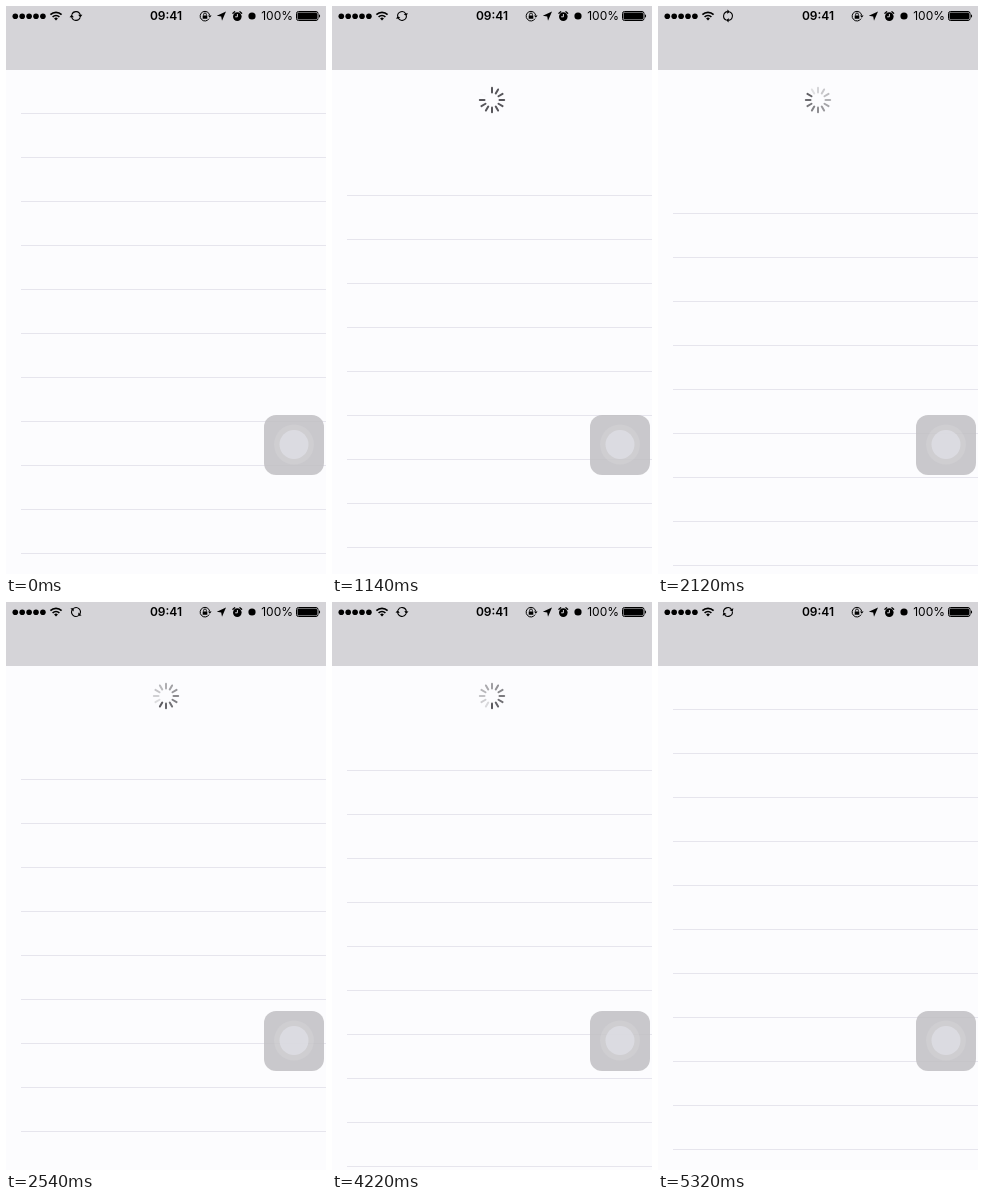
Write an HTML page that moves like this. It is 320x568 px and loops after 5.36 s.

```html
<!DOCTYPE html>
<html lang="en">
<head>
<meta charset="utf-8">
<title>Pull to refresh</title>
<style>
  html, body { margin: 0; width: 100%; height: 100%; overflow: hidden; background: #fcfcfe; }
  svg { display: block; width: 320px; height: 568px; }
  text { font-family: Inter, Roboto, "Liberation Sans", sans-serif; font-size: 12px; fill: #000; }
</style>
</head>
<body>
<svg viewBox="0 0 320 568">
  <rect width="320" height="568" fill="#fcfcfe"/>
  <g id="rows" fill="#e6e5ed"></g>
  <g id="spinner" stroke="#57565b" stroke-width="2" stroke-linecap="round"></g>

  <rect width="320" height="64" fill="#d5d4d8"/>
  <g id="signal"></g>

  <!-- wifi -->
  <g fill="none" stroke="#000" stroke-width="1.7">
    <path d="M44.4 8.6a8 8 0 0 1 11.2 0M46.6 11a4.9 4.9 0 0 1 6.8 0"/>
    <path d="M50 14.4l-1.9-2a2.8 2.8 0 0 1 3.8 0z" fill="#000" stroke="none"/>
  </g>

  <!-- sync arrows -->
  <g id="sync">
    <g id="arc">
      <path d="M65.8 8.6a4.4 4.4 0 0 1 8.5 .6" fill="none" stroke="#000" stroke-width="1.1"/>
      <path d="M72.2 8.8h4.2l-2.1 2.8z"/>
    </g>
    <use href="#arc" transform="rotate(180 70 10)"/>
  </g>

  <text x="160" y="14.4" text-anchor="middle" font-weight="600">09:41</text>

  <!-- rotation lock -->
  <g fill="none" stroke="#000">
    <path d="M203.1 12.6a4.8 4.8 0 1 1 .6-3.2" stroke-width="1"/>
    <path d="M197.6 9.6v-1.2a1.4 1.4 0 0 1 2.8 0v1.2" stroke-width=".9"/>
    <path d="M196.7 9.4h4.6v3.3h-4.6zM202 9.4h3.6l-1.8 2.4z" fill="#000" stroke="none"/>
  </g>

  <!-- location -->
  <path d="M220 5.6l-4 9.2-.8-4.2-4.4-.8z"/>

  <!-- alarm -->
  <circle cx="231.3" cy="10.6" r="4.3"/>
  <path d="M226.9 7.3l1.8-1.6M235.7 7.3l-1.8-1.6" stroke="#000" stroke-width="1.2" stroke-linecap="round"/>
  <path d="M231.4 8v2.8h-2.2" fill="none" stroke="#d5d4d8"/>

  <circle cx="246" cy="10" r="3.6"/>
  <text x="287" y="14.4" text-anchor="end">100%</text>

  <!-- battery -->
  <rect x="290.5" y="5.5" width="21.5" height="9" rx="2" fill="none" stroke="#000"/>
  <rect x="291.5" y="6.5" width="19.5" height="7" rx="1"/>
  <path d="M313 8.2a2 2 0 0 1 0 3.6z"/>

  <!-- floating button -->
  <rect x="258" y="409" width="60" height="60" rx="12" fill="#c1c0c4" fill-opacity=".85"/>
  <circle cx="288" cy="438.5" r="20" fill="#fff" fill-opacity=".1"/>
  <circle cx="288" cy="438.5" r="14.5" fill="#e2e2ea" fill-opacity=".65"/>
</svg>
<script>
const LOOP = 5360, HOLD = 60.5, PEAK = 150;
const RELEASE = 1880, CLOSE = 4586;
const rows = document.getElementById('rows');
const spinner = document.getElementById('spinner');
const sync = document.getElementById('sync');
const clamp = v => Math.min(1, Math.max(0, v));

function add(parent, tag, attrs) {
  const el = document.createElementNS('http://www.w3.org/2000/svg', tag);
  for (const key in attrs) el.setAttribute(key, attrs[key]);
  return parent.appendChild(el);
}

for (let i = 0; i < 11; i++)
  add(rows, 'rect', { x: 15, y: 107 + 44 * i, width: 305, height: 1 });

for (let i = 0; i < 5; i++)
  add(document.getElementById('signal'), 'circle', { cx: 9.3 + 6.9 * i, cy: 10.3, r: 2.8 });

const petals = Array.from({ length: 12 }, (_, i) =>
  add(spinner, 'line', { x1: 0, y1: -7.5, x2: 0, y2: -12.2, transform: `rotate(${30 * i})` }));

// Finger drag as time, distance and speed
const drag = [[565, 0, .1], [1140, 82, .135], [1700, 146, .05], [1850, PEAK, 0]];

function dragAt(t) {
  if (t <= drag[0][0]) return 0;
  const n = drag.findIndex(p => p[0] > t);
  if (n < 0) return PEAK;
  const [t0, y0, v0] = drag[n - 1], [t1, y1, v1] = drag[n];
  const d = t1 - t0, s = (t - t0) / d, r = 1 - s;
  return r * r * ((1 + 2 * s) * y0 + s * d * v0) + s * s * ((3 - 2 * s) * y1 - r * d * v1);
}

function pullAt(t) {
  if (t < RELEASE) return dragAt(t);
  if (t < CLOSE) return HOLD + (PEAK - HOLD) * Math.exp((RELEASE - t) / 295);
  return HOLD * (1 - clamp((t - CLOSE) / 545)) ** 2;
}

function draw(t) {
  const pull = pullAt(t);
  rows.setAttribute('transform', `translate(0 ${Math.round(pull)})`);
  sync.setAttribute('transform', `rotate(${.3 * t} 70 10)`);

  const shrink = clamp((t - CLOSE) / 250);
  spinner.setAttribute('transform',
    `translate(160 94) rotate(${120 * shrink}) scale(${1 - shrink})`);
  spinner.setAttribute('opacity', 1 - .4 * shrink);
  spinner.style.display = shrink < 1 ? '' : 'none';

  const fade = clamp((t - 1700) / 300);
  const head = ((t - 3340) / 580 * 12 % 12 + 12) % 12;
  petals.forEach((petal, i) => {
    const shown = t < RELEASE ? clamp((pull - 12) / 7 - i) : 1;
    const age = (head - i + 12) % 12 / 12;
    petal.setAttribute('opacity', shown * (1 - .85 * fade * age));
  });
}

const start = performance.now();
function tick() {
  draw((performance.now() - start) % LOOP);
  requestAnimationFrame(tick);
}
tick();
</script>
</body>
</html>
```
